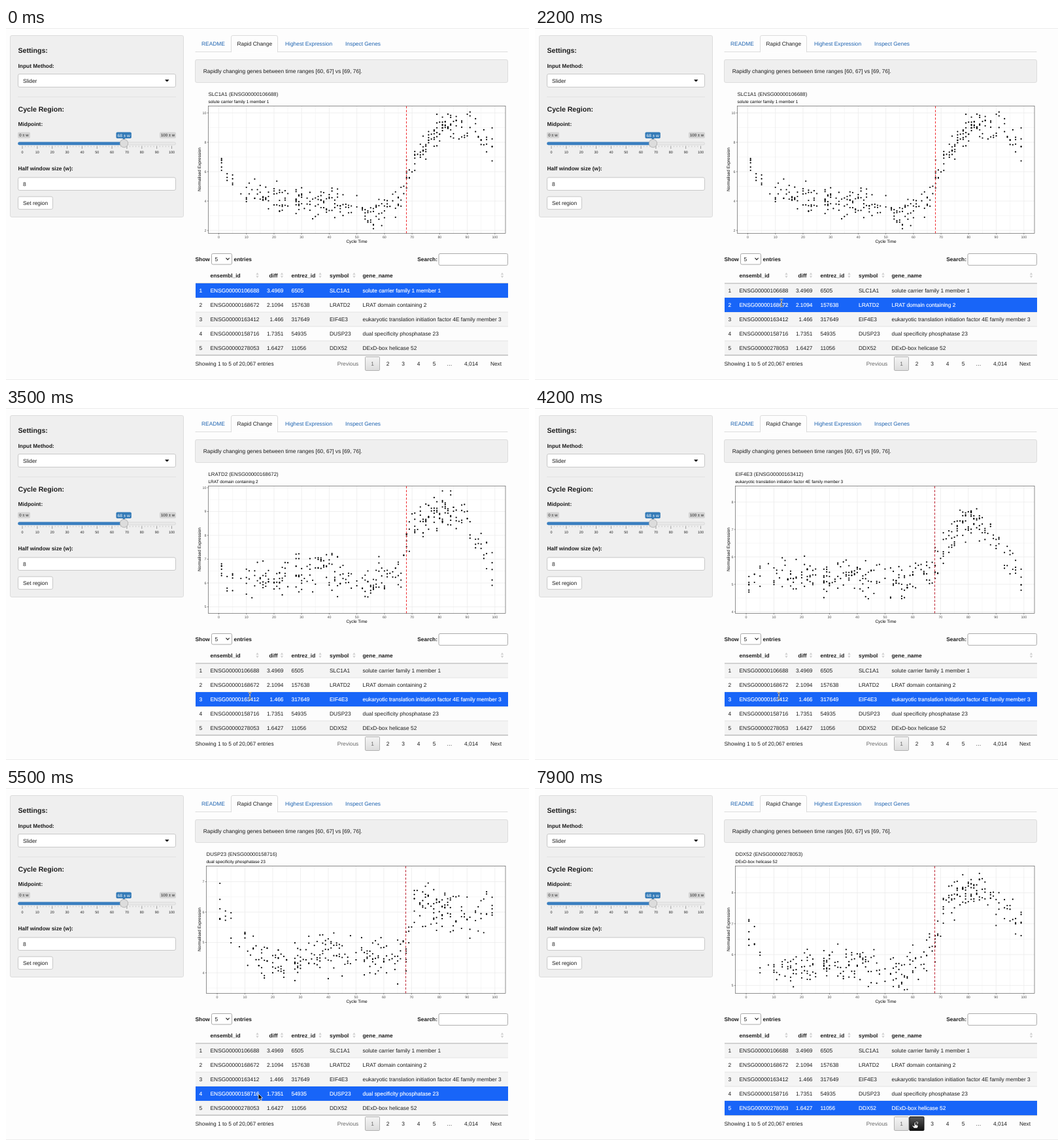
An HTML page that plays this animation: 800 px wide and 539 px high, repeating every 8 s.

```html
<!DOCTYPE html>
<html lang="en">
<head>
<meta charset="utf-8">
<title>Gene explorer</title>
<style>
html, body { margin: 0; width: 100%; height: 100%; overflow: hidden; background: #fdfdfd; }
svg { display: block; width: 800px; height: 539px; font: 8.4px "Liberation Sans", Arial, sans-serif; fill: #1c1c1c; text-rendering: geometricPrecision; }
.b { font-weight: bold; }
.h { font-weight: bold; font-size: 10.6px; }
.link { fill: #1c62b0; }
.mid { text-anchor: middle; }
.end { text-anchor: end; }
.well { fill: #efefef; stroke: #dcdcdc; }
.field { fill: #fff; stroke: #c8c8c8; }
.tiny { font-size: 6px; }
.tick { font-size: 5.3px; fill: #4d4d4d; }
.axis { font-size: 6.5px; fill: #000; }
.picked { fill: #fff; stroke: #fff; stroke-width: .15px; }
#cursor { animation: travel 8s infinite ease-in-out; }
@keyframes travel {
  0%, 1.25% { transform: translate(386px, 461px); }
  11%, 28% { transform: translate(377px, 421px); }
  34%, 55% { transform: translate(373px, 441px); }
  62.5%, 75.5% { transform: translate(386px, 468px); }
  81%, 94% { transform: translate(389px, 491px); }
  98.5%, 100% { transform: translate(581px, 512px); }
}
</style>
</head>
<body>
<svg id="stage" viewBox="0 0 800 539"></svg>
<script>
const LOOP = 8000;
let rules = '', ruleCount = 0;

// Wraps markup so that it is visible only from a to b (ms).
function during(a, b, body) {
  const name = 'show' + ruleCount++;
  rules += `@keyframes ${name}{0%{opacity:0}${a * 100 / LOOP}%{opacity:1}` +
    `${b * 100 / LOOP}%{opacity:${b < LOOP ? 0 : 1}}100%{opacity:${b < LOOP ? 0 : 1}}}`;
  return `<g style="animation:${name} ${LOOP}ms step-end infinite">${body}</g>`;
}
const text = (x, y, s, cls = '', extra = '') => `<text x="${x}" y="${y}" class="${cls}" ${extra}>${s}</text>`;
const box = (x, y, x2, y2, extra) => `<rect x="${x}" y="${y}" width="${x2 - x}" height="${y2 - y}" ${extra}/>`;
const line = (x, y, x2, y2, color, w = 1) => `<path d="M${x} ${y}L${x2} ${y2}" stroke="${color}" stroke-width="${w}"/>`;
const shape = (d, extra = '') => `<path d="${d}" ${extra}/>`;
const range = (n, f) => Array.from({ length: n }, (_, i) => f(i)).join('');

function random(seed) {
  return () => {
    seed = seed + 0x6D2B79F5 | 0;
    let t = Math.imul(seed ^ seed >>> 15, 1 | seed);
    t = t + Math.imul(t ^ t >>> 7, 61 | t) ^ t;
    return ((t ^ t >>> 14) >>> 0) / 4294967296;
  };
}

function sidebar() {
  const tickX = i => 25 + i * 4.57;
  return box(6.5, 11.5, 271.5, 289.5, 'class="well" rx="2.4"') +
    text(18.5, 38, 'Settings:', 'h') +
    text(18.5, 60.5, 'Input Method:', 'b') +
    box(18.5, 70.5, 259.5, 90.5, 'class="field" rx="2.4"') +
    text(26, 83.8, 'Slider') + shape('M243 79h6.6l-3.3 3.6z', 'fill="#111"') +
    line(18, 105.5, 260, 105.5, '#e2e2e2') +
    text(18.5, 128, 'Cycle Region:', 'h') +
    text(18.5, 149.5, 'Midpoint:', 'b') +
    box(18, 159.5, 37, 168.8, 'fill="#d4d4d4" rx="1.8"') + text(27.5, 166.3, '0 ± w', 'tiny mid') +
    box(235, 159.5, 260, 168.8, 'fill="#d4d4d4" rx="1.8"') + text(247.5, 166.3, '100 ± w', 'tiny mid') +
    box(168.5, 159.5, 191.8, 169, 'fill="#337ab7" rx="1.8"') + shape('M178.3 169h4l-2 2.6z', 'fill="#337ab7"') +
    text(180.2, 166.6, '68 ± w', 'mid', 'font-size="6.6" style="fill:#fff"') +
    box(18.5, 174.8, 259.5, 179, 'fill="#e9e9e9" stroke="#cfcfcf" stroke-width=".6" rx="2"') +
    box(18.3, 174.5, 180, 179.3, 'fill="#3a7fc0" rx="2"') +
    range(51, i => line(tickX(i), 180.5, tickX(i), i % 5 ? 182.3 : 185, i % 5 ? '#aaa' : '#666', .6)) +
    range(11, i => text(tickX(i * 5), 192, i * 10, 'mid', 'font-size="5.4"')) +
    '<circle cx="180.5" cy="176.6" r="6.2" fill="#dcdcdc" stroke="#a9a9a9" stroke-width=".8"/>' +
    text(18.5, 218, 'Half window size (w):', 'b') +
    box(18.5, 228.9, 259.5, 248.5, 'class="field" rx="2.4"') + text(26, 241.8, '8') +
    box(18.5, 258.2, 71.5, 277.6, 'class="field" rx="2.4"') + text(26, 270.8, 'Set region');
}

function tabs() {
  return line(289.5, 36.5, 767.5, 36.5, '#dcdcdc') +
    shape('M344.5 37.2V13.9q0-2.4 2.4-2.4h66.2q2.4 0 2.4 2.4v23.3', 'fill="#fdfdfd" stroke="#dcdcdc"') +
    text(299, 26.8, 'README', 'link') + text(353.5, 26.8, 'Rapid Change') +
    text(427, 26.8, 'Highest Expression', 'link') + text(519, 26.8, 'Inspect Genes', 'link') +
    box(289.5, 48.5, 767.5, 83.5, 'class="well" rx="2.4"') +
    text(301.8, 68.8, 'Rapidly changing genes between time ranges [60, 67] vs [69, 76].');
}

const genes = [
  ['ENSG00000106688', '3.4969', '6505', 'SLC1A1', 'solute carrier family 1 member 1'],
  ['ENSG00000168672', '2.1094', '157638', 'LRATD2', 'LRAT domain containing 2'],
  ['ENSG00000163412', '1.466', '317649', 'EIF4E3', 'eukaryotic translation initiation factor 4E family member 3'],
  ['ENSG00000158716', '1.7351', '54935', 'DUSP23', 'dual specificity phosphatase 23'],
  ['ENSG00000278053', '1.6427', '11056', 'DDX52', 'DExD-box helicase 52']
];
const picked = [0, 2000, 3500, 5300, 6500, LOOP];
const hovered = [0, 700, 2600, 4800, 6320];
const plotted = [0, 2700, 4200, 5450, 6900, LOOP];

// Samples per cycle time, 0 to 99.
const counts = [
  0, 6, 0, 3, 0, 4, 0, 0, 1, 0,
  4, 2, 1, 3, 2, 3, 5, 4, 4, 0,
  4, 3, 6, 4, 4, 2, 0, 0, 8, 6,
  5, 1, 2, 4, 2, 3, 4, 5, 4, 4,
  4, 4, 4, 4, 4, 3, 2, 3, 2, 0,
  2, 0, 3, 4, 4, 4, 5, 4, 4, 3,
  4, 3, 1, 2, 3, 4, 3, 2, 7, 3,
  1, 6, 1, 4, 5, 5, 6, 2, 6, 6,
  4, 8, 5, 4, 6, 3, 4, 1, 4, 2,
  3, 3, 0, 3, 2, 3, 2, 4, 0, 5
];
const knots = [1, 8, 16, 28, 40, 48, 56, 66, 68, 71, 76, 82, 90, 99];
// top: highest tick and its y; unit: pixels per 1; mean: curve at the knots.
const plots = [
  { left: 309.5, top: [10, 130], unit: 22.5, step: 2, ticks: 5, sd: .5,
    mean: [6.4, 4.9, 4.3, 4, 3.9, 3.4, 3, 4.3, 5.6, 6.7, 8, 9.2, 9.2, 7.7] },
  { left: 309.5, top: [10, 122], unit: 36.5, step: 1, ticks: 6, sd: .38,
    mean: [6.5, 6.2, 6.1, 6.4, 6.6, 6.1, 5.9, 6.5, 7.7, 8.4, 8.8, 9.1, 8.6, 6.6] },
  { left: 306.5, top: [8, 144], unit: 42, step: 1, ticks: 5, sd: .3,
    mean: [5.1, 5.25, 5.3, 5.2, 5.3, 5.15, 5, 5.4, 5.8, 6.4, 7, 7.4, 6.6, 5.3] },
  { left: 306.5, top: [7, 143.5], unit: 46.5, step: 1, ticks: 4, sd: .37,
    mean: [6.1, 5.2, 4.4, 4.3, 4.7, 4.6, 4.6, 4.5, 5, 6.2, 6.3, 6.1, 5.7, 6.3] },
  { left: 306.5, top: [8, 160.5], unit: 47.3, step: 1, ticks: 4, sd: .29,
    mean: [6.6, 5.6, 5.6, 5.7, 5.7, 5.5, 5.4, 6, 6.5, 7.5, 7.9, 8.2, 7.7, 7] }
];

function curve(mean, x) {
  const i = Math.max(1, knots.findIndex(k => k >= x));
  const f = (x - knots[i - 1]) / (knots[i] - knots[i - 1]);
  return mean[i - 1] + f * (mean[i] - mean[i - 1]);
}

function plot(p, n) {
  const [id, , , symbol, name] = genes[n];
  const x0 = p.left === 309.5 ? 325.5 : 323, dx = (747.8 - x0) / 100;
  const px = x => x0 + x * dx, py = v => p.top[1] + (p.top[0] - v) * p.unit;
  const rnd = random(41 + n), noise = () => (rnd() + rnd() + rnd() - 1.5) * 2 * p.sd;
  let out = text(p.left, 104, `${symbol} (${id})`, '', 'font-size="7.85"') +
    text(p.left, 114.8, name, 'axis') + box(p.left, 119.5, 764, 314.5, 'fill="#fff"');
  for (let x = 0; x <= 100; x += 5) {
    out += line(px(x), 119.5, px(x), 314.5, '#ebebeb', x % 10 ? .4 : .8);
    if (x % 10 === 0) out += line(px(x), 314.5, px(x), 316.2, '#333', .6) + text(px(x), 321.6, x, 'tick mid');
  }
  for (let i = -1; i < p.ticks * 2; i++) {
    const v = p.top[0] - i * p.step / 2, y = py(v);
    if (y < 120 || y > 314) continue;
    out += line(p.left, y, 764, y, '#ebebeb', i % 2 ? .4 : .8);
    if (i % 2 === 0) out += line(p.left - 1.7, y, p.left, y, '#333', .6) + text(p.left - 3, y + 1.9, v, 'tick end');
  }
  counts.forEach((count, x) => {
    for (let i = 0; i < count; i++) {
      const y = Math.min(309, Math.max(127, py(curve(p.mean, x) + noise())));
      out += `<circle cx="${px(x).toFixed(1)}" cy="${y.toFixed(1)}" r="1.1" fill="#000"/>`;
    }
  });
  const midX = Math.floor(px(68)) + .5;
  return out + shape(`M${midX} 314.5V119.5`, `stroke="${n < 2 ? '#f0282c' : '#bd1f2d'}" stroke-dasharray="3.4 2.4"`) +
    box(p.left, 119.5, 764, 314.5, 'fill="none" stroke="#555" stroke-width=".65"') +
    text(536.5, 328.8, 'Cycle Time', 'axis mid') +
    text(0, 0, 'Normalised Expression', 'axis mid', 'transform="translate(297.6 216.5) rotate(-90)"');
}

function rowText([id, diff, entrez, symbol, name], n) {
  const y = 405 + n * 22;
  return text(295.5, y, n + 1) + text(312.5, y, id) + text(424.5, y, diff, 'end') +
    text(436.5, y, entrez) + text(495, y, symbol) + text(545.5, y, name);
}

function table() {
  const heads = [[312.5, 'ensembl_id', 384.5], [402.5, 'diff', 422], [436.5, 'entrez_id', 480.5],
    [495, 'symbol', 532.5], [545.5, 'gene_name', 759]];
  let out = text(289.5, 356.8, 'Show', 'b') + box(314.5, 345.5, 345.5, 362, 'fill="#fff" stroke="#aaa" rx="2"') +
    text(319.5, 357, '5') + shape('M336.5 352.2l2.6 2.6 2.6-2.6', 'fill="none" stroke="#222" stroke-width="1.2"') +
    text(348.5, 356.8, 'entries', 'b') + text(660, 357.2, 'Search:', 'b end') +
    box(662, 345.5, 767.5, 363.3, 'fill="#fff" stroke="#aaa" rx="2"');
  for (const [x, label, icon] of heads) {
    out += text(x, 382, label, 'b') +
      shape(`M${icon - 2.2} 377.8h4.4l-2.2-3.2zm0 1.8h4.4l-2.2 3.2z`, 'fill="#d0d0d0"');
  }
  const area = (n, extra) => box(290, 391 + n * 22, 768, 413 + n * 22, extra);
  let bars = '';
  genes.forEach((gene, n) => {
    const y = 391 + n * 22;
    out += area(n, `fill="${n % 2 ? '#fdfdfd' : '#f4f4f4'}"`) + line(290, y, 768, y, n ? '#dedede' : '#999', .8) +
      (n ? during(hovered[n], picked[n], area(n, 'fill="#000" fill-opacity=".03"')) : '') + rowText(gene, n);
    bars += during(picked[n], picked[n + 1], area(n, 'fill="#1865f8"') + `<g class="picked">${rowText(gene, n)}</g>`);
  });
  return out + line(290, 501, 768, 501, '#888', .8) + bars;
}

function pager() {
  const pages = [[584, 2], [607.5, 3], [631, 4], [655, 5], [678.5, '…'], [711.5, '4,014'], [749.5, 'Next']];
  return text(289.5, 516.6, 'Showing 1 to 5 of 20,067 entries') +
    text(523, 516.8, 'Previous', 'mid', 'style="fill:#666"') +
    box(549.5, 503.5, 571.5, 524.5, 'fill="url(#light)" stroke="#b0b0b0" rx="1.2"') +
    text(560.5, 516.8, 1, 'mid', 'style="fill:#666"') +
    pages.map(([x, s]) => text(x, 516.8, s, 'mid')).join('') +
    during(7800, LOOP, box(572.8, 503.5, 595, 524.5, 'fill="url(#dark)" stroke="#111" rx="1.2"') +
      text(584, 516.8, 2, 'mid', 'style="fill:#fff"'));
}

function cursor() {
  const beam = 'M-2.4-5.5Q0-5.5 0-3.8Q0-5.5 2.4-5.5M0-4V4M-2.4 5.5Q0 5.5 0 3.8Q0 5.5 2.4 5.5M-1.2 1.5H1.2';
  const arrow = 'M0 0V9.4L2.1 7.4 3.6 10.8 5.2 10.1 3.7 6.8H6.6Z';
  const hand = 'M-1 0Q0-1 1 0V3.4L4.6 4.4Q5.2 4.8 5 6.4L4 9H-1.4L-4 5.4Q-3.8 4-2.4 4.8L-1 6Z';
  const stroke = (color, w) => `fill="none" stroke="${color}" stroke-width="${w}"`;
  return '<g id="cursor">' +
    during(100, 4700, shape(beam, stroke('#fff', 2)) + shape(beam, stroke('#222', .8))) +
    during(4700, 7750, shape(arrow, 'fill="#000" stroke="#fff" stroke-width=".8"')) +
    during(7750, LOOP, shape(hand, 'fill="#fff" stroke="#000" stroke-width=".8"')) + '</g>';
}

const gradient = (id, a, b) => `<linearGradient id="${id}" x2="0" y2="1">` +
  `<stop stop-color="${a}"/><stop offset="1" stop-color="${b}"/></linearGradient>`;

document.getElementById('stage').innerHTML =
  `<defs>${gradient('light', '#f4f4f4', '#dcdcdc')}${gradient('dark', '#585858', '#111')}</defs>` +
  line(0, .5, 800, .5, '#ececec') + line(0, 538.5, 800, 538.5, '#ececec') +
  sidebar() + tabs() + plots.map((p, n) => during(plotted[n], plotted[n + 1], plot(p, n))).join('') +
  table() + pager() + cursor();
document.head.appendChild(document.createElement('style')).textContent = rules;
</script>
</body>
</html>
```
